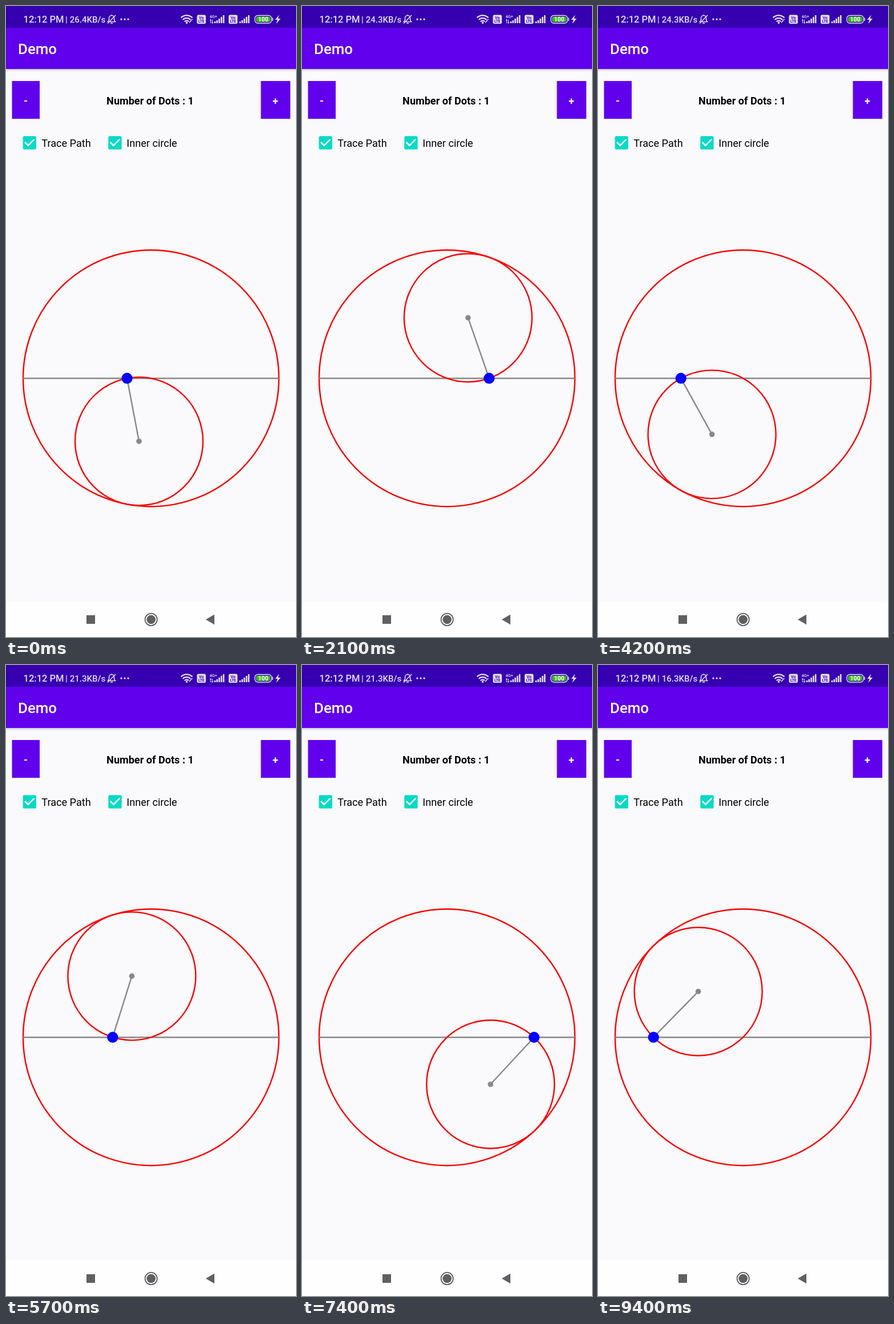
An HTML page for the animation above (9500 ms loop, 508 by 1102 pixels).

```html
<!DOCTYPE html>
<html lang="en">
<head>
<meta charset="utf-8">
<title>Rolling circle</title>
<style>
  html, body { margin: 0; width: 100%; height: 100%; overflow: hidden; background: #faf9fc; }
  svg { display: block; width: 100%; height: 100%; font-family: Roboto, sans-serif; }
  .label { font-size: 18.1px; }
  .bold { font-weight: 700; text-anchor: middle; }
  .status { font-weight: 500; }
  .ring { fill: none; stroke: #f80000; stroke-width: 2.4; }
  .rod { stroke: #888; stroke-width: 2.4; }
</style>
</head>
<body>
<svg viewBox="0 0 508 1102">
  <defs>
    <linearGradient id="shadow" x2="0" y2="1">
      <stop stop-color="#000" stop-opacity=".16"/>
      <stop offset="1" stop-color="#000" stop-opacity="0"/>
    </linearGradient>
    <g id="checkbox" transform="scale(1.294)">
      <rect x="3" y="3" width="18" height="18" rx="2" fill="#03dac5"/>
      <path d="M10 17l-5-5 1.41-1.41L10 14.17l7.59-7.59L19 8z" fill="#fff"/>
    </g>
    <g id="volte">
      <rect width="15.5" height="15.5" rx="2.5" fill="#e6dff5"/>
      <g fill="#3700b3" font-size="7" font-weight="700" text-anchor="middle">
        <text x="7.7" y="7.3">Vo</text>
        <text x="7.7" y="13.8" font-size="6.5">LTE</text>
      </g>
    </g>
    <path id="signal" d="M1.5 15v-3M5.3 15v-5M9.1 15v-8M12.9 15v-11M16.7 15v-14" stroke="#e6dff5" stroke-width="2.6"/>
  </defs>

  <rect width="508" height="1102" fill="#faf9fc"/>
  <rect y="110" width="508" height="5" fill="url(#shadow)"/>
  <rect y="38" width="508" height="72" fill="#6000ed"/>
  <rect width="508" height="38" fill="#3600b0"/>
  <rect y="1040" width="508" height="62" fill="#fefdff"/>

  <g class="status" fill="#e6dff5">
    <text x="30.5" y="29" font-size="16.5">12:12 PM</text>
    <text x="104" y="28.5" font-size="15">|</text>
    <text id="speed" x="111.8" y="29" font-size="15"></text>
    <g fill="none" stroke="#e6dff5" stroke-width="1.5">
      <path d="M178.5 27.5h13l-2-3v-3.500a4.500 4.500 0 0 0-9 0v3.500zM183 30h4M185 16.500v-1.500M192 16l-14 14.500"/>
    </g>
    <circle cx="202" cy="23.200" r="1.600"/>
    <circle cx="208" cy="23.200" r="1.600"/>
    <circle cx="214" cy="23.200" r="1.600"/>
    <g fill="none" stroke="#e6dff5" stroke-width="2.200">
      <path d="M306.500 20.500a14 14 0 0 1 20 0M309.700 24a9.500 9.500 0 0 1 13.600 0M312.800 27.200a5 5 0 0 1 7.400 0"/>
      <path d="M321 29l5.500-6" stroke-width="1.400"/>
    </g>
    <circle cx="316.500" cy="29.200" r="1.800"/>
    <use href="#volte" x="334.500" y="15.500"/>
    <text x="356.500" y="20.800" font-size="7.500">4G+</text>
    <path d="M358.500 30v-6M357 25.500l1.500-2 1.500 2M361.500 24v6M360 28.500l1.500 2 1.500-2" fill="none" stroke="#e6dff5"/>
    <use href="#signal" x="364.500" y="15"/>
    <use href="#volte" x="390" y="15.500"/>
    <use href="#signal" x="408.500" y="15"/>
    <rect x="436" y="16.500" width="29" height="13.500" rx="5" fill="none" stroke="#e6dff5" stroke-width="1.400"/>
    <rect x="438" y="18.500" width="25" height="9.500" rx="3" fill="#3bb820"/>
    <path d="M467 20.500v5.500" stroke="#e6dff5" stroke-width="1.500"/>
    <text x="450.500" y="27" font-size="10.500" font-weight="700" text-anchor="middle" fill="#fff">100</text>
    <path d="M478.500 15.500l-7 8.500h4l-2 7 7.500-9h-4.500z"/>
  </g>

  <text x="21" y="84" font-size="25.9" font-weight="500" fill="#fff">Demo</text>

  <rect x="10.500" y="131" width="48.500" height="66" fill="#6000ed"/>
  <rect x="446.500" y="131" width="51.500" height="66" fill="#6000ed"/>
  <g class="label bold">
    <text x="34.500" y="171.500" fill="#fff">-</text>
    <text x="472" y="171.500" fill="#fff">+</text>
    <text x="252.500" y="171.500">Number of Dots : 1</text>
  </g>
  <use href="#checkbox" x="0" y="0" transform="translate(25.800 223.400)"/>
  <use href="#checkbox" x="0" y="0" transform="translate(175.400 223.400)"/>
  <g class="label">
    <text x="62.300" y="245.800">Trace Path</text>
    <text x="211.300" y="245.800">Inner circle</text>
  </g>

  <circle class="ring" cx="254" cy="650.200" r="224"/>
  <path class="rod" d="M30 650.200H478"/>
  <circle class="ring" id="inner" r="112"/>
  <line class="rod" id="arm" y2="650.200"/>
  <circle id="hub" r="4.800" fill="#888"/>
  <circle id="dot" cy="650.200" r="9.600" fill="#00f"/>

  <g fill="#5f5f5f">
    <rect x="141" y="1064" width="15" height="15"/>
    <circle cx="254.200" cy="1071.500" r="7.800"/>
    <circle cx="254.200" cy="1071.500" r="10.600" fill="none" stroke="#5f5f5f" stroke-width="1.800"/>
    <path d="M350 1071.500l15-8.700v17.400z"/>
  </g>
</svg>
<script>
  const LOOP = 9500, STEP = 100;
  const CENTER = { x: 254, y: 650.2 }, RADIUS = 112;

  // Close to 90 degrees per second, with slight unevenness: [ms, degrees].
  const ANGLES = [[0, 100.8], [1200, 208.9], [3100, 378.5], [4200, 479.05],
                  [5700, 612.55], [7400, 767.1], [9400, 945.6]];
  const SPEEDS = [[0, "26.4"], [1300, "24.3"], [5300, "21.3"], [9300, "16.3"]];

  const byId = id => document.getElementById(id);
  const [speed, inner, arm, hub, dot] = ["speed", "inner", "arm", "hub", "dot"].map(byId);

  function setAttributes(element, values) {
    for (const name in values) element.setAttribute(name, values[name]);
  }

  function angleAt(time) {
    const next = Math.max(1, ANGLES.findIndex(([t]) => t >= time));
    const [t0, a0] = ANGLES[next - 1], [t1, a1] = ANGLES[next];
    return (a0 + (a1 - a0) * (time - t0) / (t1 - t0)) * Math.PI / 180;
  }

  function draw(time) {
    const angle = angleAt(time);
    const dx = RADIUS * Math.cos(angle);
    const x = CENTER.x + dx, y = CENTER.y + RADIUS * Math.sin(angle);
    const dotX = CENTER.x + 2 * dx;
    setAttributes(inner, { cx: x, cy: y });
    setAttributes(hub, { cx: x, cy: y });
    setAttributes(arm, { x1: x, y1: y, x2: dotX });
    setAttributes(dot, { cx: dotX });
    speed.textContent = SPEEDS.filter(([t]) => t <= time).pop()[1] + "KB/s";
  }

  const start = performance.now();
  function tick() {
    const elapsed = (performance.now() - start) % LOOP;
    draw(Math.floor(elapsed / STEP) * STEP);
    requestAnimationFrame(tick);
  }
  tick();
</script>
</body>
</html>
```
